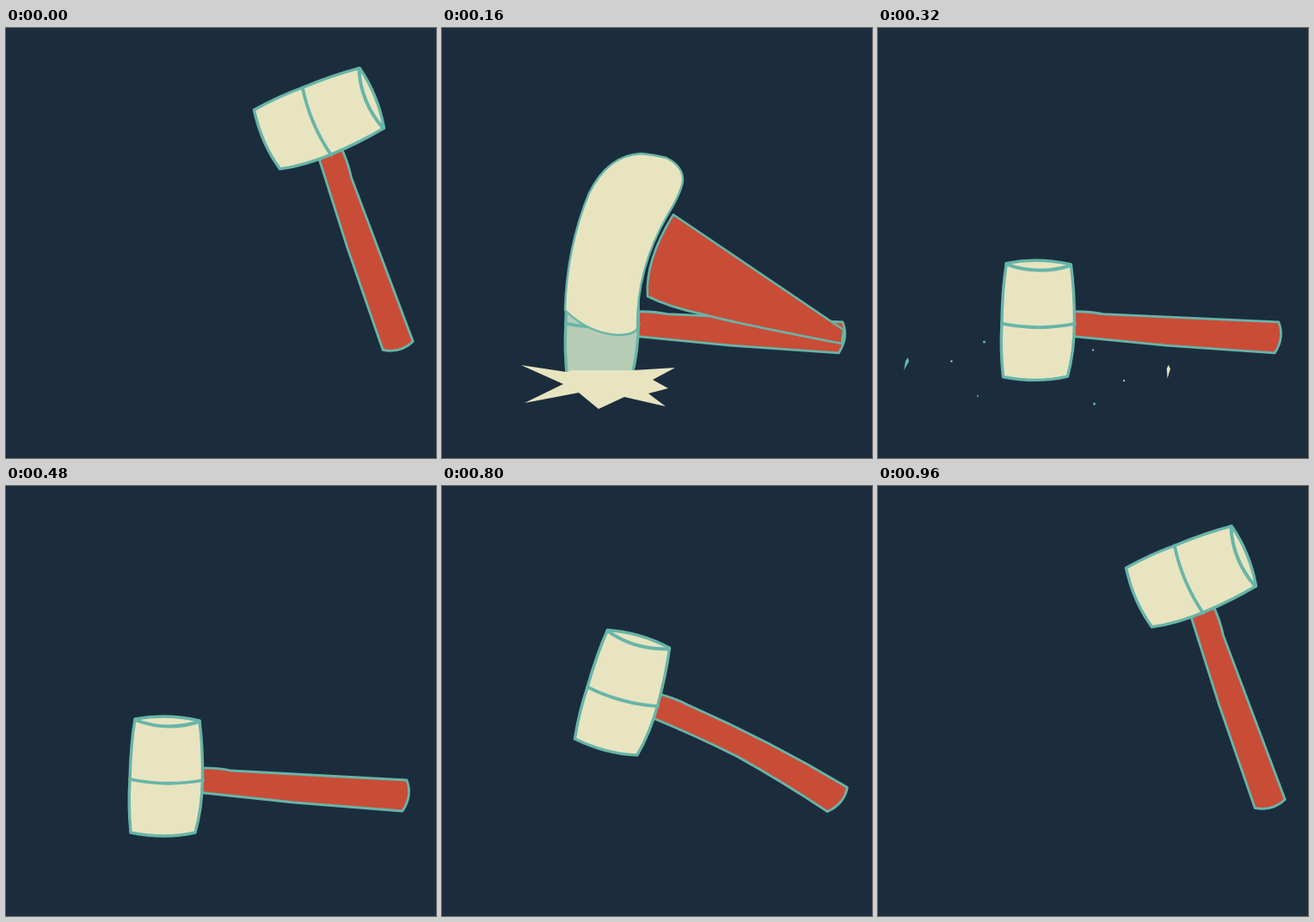
An HTML page with a canvas that plays this animation: 500x500 px, repeating every 1 s.

```html
<!DOCTYPE html>
<html lang="en">
<head>
<meta charset="utf-8">
<title>Mallet</title>
<style>
html, body { margin: 0; height: 100%; overflow: hidden; background: #1b2d3d; }
canvas { display: block; }
</style>
</head>
<body>
<canvas id="stage" width="500" height="500"></canvas>
<script>
const ctx = document.getElementById('stage').getContext('2d');
const BG = '#1b2d3d', CREAM = '#e8e4c0', TEAL = '#67b5a8', RED = '#c94c37', TINT = '#b6ccb5';
const STEP = 40, LOOP = 1000, RAD = Math.PI / 180;
const LENGTH = 236, TILT = 0.077, END = [464, 360];

// time, angle of the handle's end, angle of the head (degrees)
const KEYS = [
  [0, 66.3, 66.3], [40, 64, 65], [80, 56, 58], [120, 26, 26], [160, -0.5, -0.5],
  [320, -0.5, -0.5], [480, 0, 0], [560, 1, 1], [640, 7, 6], [720, 17, 9],
  [800, 31.5, 14.6], [880, 56, 43], [960, 66.3, 66.3], [1000, 66.3, 66.3]
];

// Start point, then control and end point of each quadratic curve
const HANDLE = [222, 328, 244, 327, 262, 331, 364, 336.5, 466, 342, 473, 360, 461, 378,
  398, 373, 335, 368, 280, 362, 222, 356];
const HEAD = [150, 271, 187, 264, 225, 273, 229, 305, 228.5, 340, 228, 375, 220, 403,
  185, 411, 145, 403, 142, 370, 144, 342, 145, 300, 150, 271];
const RIM = [150, 272, 187, 286, 225, 274];
const BAND = [144, 341, 187, 350, 229, 342];
const HEAD_TRAIL = [143, 328, 145, 255, 171, 192, 193, 148, 231, 146, 245, 147, 261, 151,
  281, 161, 280, 178, 278, 192, 262, 218, 226, 280, 227, 350, 222, 357, 205, 357, 170, 355, 143, 328];
const HANDLE_TRAIL = [269, 217, 368, 284, 467, 351, 466, 359, 465, 367, 340, 343, 304, 333,
  265, 325, 239, 312, 236, 270, 269, 217];
const STAR = [92, 392, 145, 400, 150, 398, 222, 398, 271, 395, 245, 409, 263, 419, 240, 425,
  260, 440, 212, 429, 182, 443, 159, 424, 96, 436, 141, 414];
const SHARD = [2, -7, 3, -2, -3, 8, -1, -3];
const HIT = [185, 405];
const DOTS = [[123.5, 365, 1.6, TEAL], [85.5, 387.5, 1.1, CREAM], [250, 374.5, 1, CREAM],
  [251.5, 437, 1.5, TEAL], [286, 410, 1.1, CREAM], [116, 428, 1, TEAL]];

function pose(t) {
  const i = KEYS.findIndex(k => k[0] > t);
  const a = KEYS[i - 1], b = KEYS[i], f = (t - a[0]) / (b[0] - a[0]);
  return [1, 2].map(n => (a[n] + (b[n] - a[n]) * f) * RAD);
}

// Bends the resting mallet along an arc from its handle end to its head
function bender([end, head]) {
  const c = Math.cos(TILT), s = Math.sin(TILT), lift = end / (66.3 * RAD);
  return (x, y) => {
    const dx = x - END[0], dy = y - END[1];
    const u = -dx * c - dy * s, v = dy * c - dx * s;
    const w = Math.max(0, Math.min(LENGTH, u));
    const turn = (head - end) * w / LENGTH;
    const chord = TILT + end + turn / 2, dir = TILT + end + turn;
    return [
      END[0] - 8 * lift - w * Math.cos(chord) - (u - w) * Math.cos(dir) - v * Math.sin(dir),
      END[1] + 10 * lift - w * Math.sin(chord) - (u - w) * Math.sin(dir) + v * Math.cos(dir)
    ];
  };
}

function curve(p, fill, width, warp = (x, y) => [x, y]) {
  ctx.beginPath();
  ctx.moveTo(...warp(p[0], p[1]));
  for (let i = 2; i < p.length; i += 4)
    ctx.quadraticCurveTo(...warp(p[i], p[i + 1]), ...warp(p[i + 2], p[i + 3]));
  if (fill) {
    ctx.closePath();
    ctx.fillStyle = fill;
    ctx.fill();
  }
  ctx.lineWidth = width;
  ctx.stroke();
}

function polygon(p, fill) {
  ctx.beginPath();
  for (let i = 0; i < p.length; i += 2) ctx.lineTo(p[i], p[i + 1]);
  ctx.fillStyle = fill;
  ctx.fill();
}

function mallet(t) {
  const warp = bender(pose(t));
  curve(HANDLE, RED, 2.8, warp);
  curve(HEAD, t === 160 ? TINT : CREAM, 3.4, warp);
  curve(RIM, null, 4, warp);
  curve(BAND, null, 3.8, warp);
}

function trail(angle) {
  ctx.save();
  ctx.translate(466, 360);
  ctx.rotate(angle);
  ctx.translate(-466, -360);
  curve(HANDLE_TRAIL, RED, 2.6);
  curve(HEAD_TRAIL, CREAM, 2.4);
  ctx.restore();
}

function star(scale) {
  polygon(STAR.map((v, i) => HIT[i % 2] + (v - HIT[i % 2]) * scale), CREAM);
}

function debris(t) {
  const left = (320 - t) / 80;
  const spread = 1 - 0.25 * left * left, size = 1 + 2 * left;
  const place = (x, y) => [HIT[0] + (x - HIT[0]) * spread, HIT[1] + (y - HIT[1]) * spread];
  for (const [x, y, turn, color] of [[33, 390, 0, TEAL], [337.5, 399, -0.25, CREAM]]) {
    ctx.save();
    ctx.translate(...place(x, y));
    ctx.rotate(turn);
    ctx.scale(size, size);
    polygon(SHARD, color);
    ctx.restore();
  }
  for (const [x, y, r, color] of DOTS) {
    ctx.beginPath();
    ctx.arc(...place(x, y), r * size, 0, 7);
    ctx.fillStyle = color;
    ctx.fill();
  }
}

function draw() {
  const t = Math.floor(performance.now() % LOOP / STEP) * STEP;
  ctx.fillStyle = BG;
  ctx.fillRect(0, 0, 500, 500);
  ctx.strokeStyle = TEAL;
  ctx.lineJoin = ctx.lineCap = 'round';
  if (t === 200) star(1.5);
  if (t >= 240 && t <= 320) debris(t);
  mallet(t);
  if (t === 120 || t === 160) trail(Math.max(0, pose(t)[0]));
  if (t === 160) star(1);
  requestAnimationFrame(draw);
}
draw();
</script>
</body>
</html>
```
